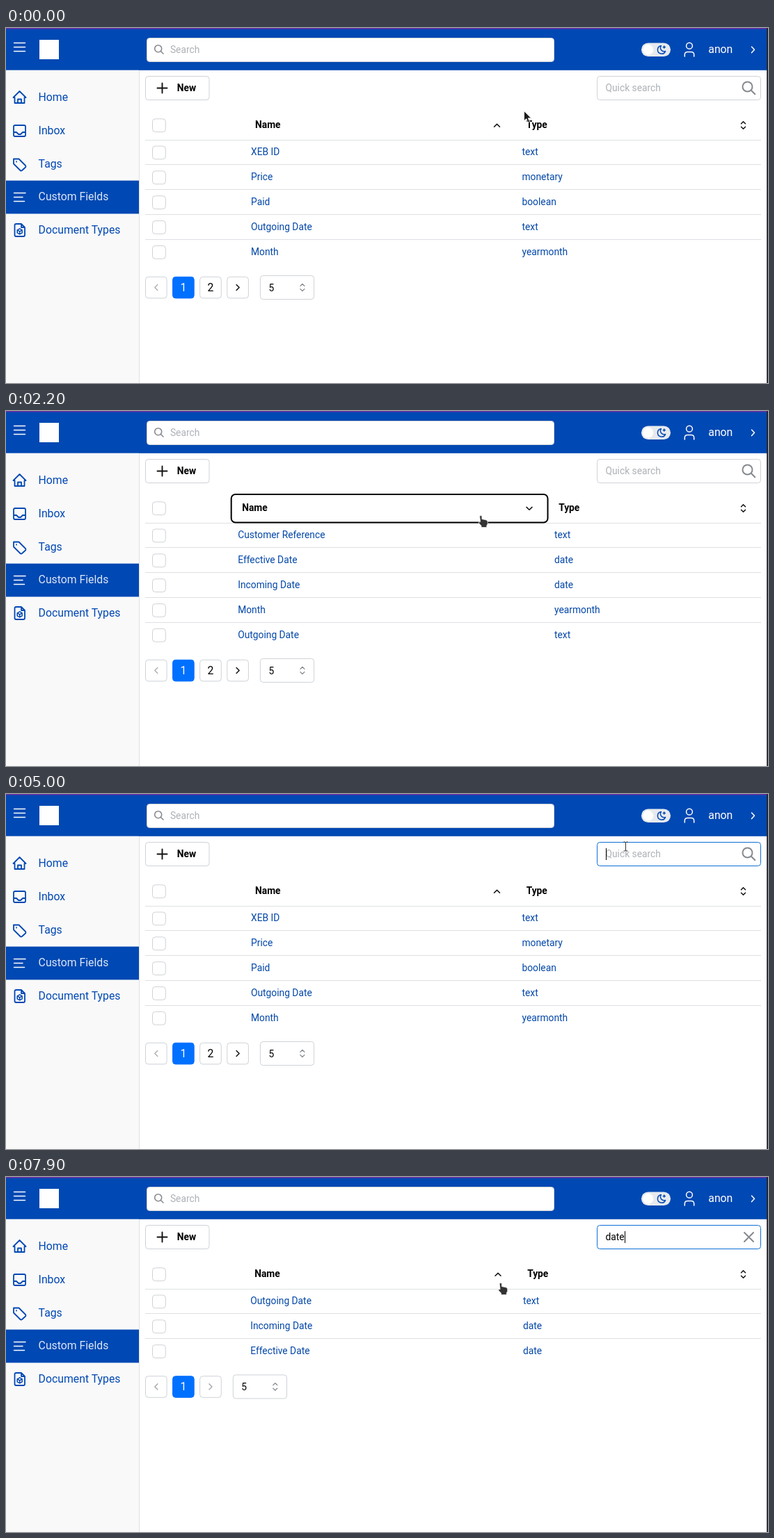
Animation, 1095 px wide and 511 px high, one loop 8 s. Source, as an HTML page:

```html
<!DOCTYPE html>
<html lang="en">
<head>
<meta charset="utf-8">
<title>Custom fields</title>
<style>
  html, body { margin: 0; width: 100%; height: 100%; overflow: hidden; background: #fff; }
  svg { display: block; font: 13.8px Roboto, sans-serif; --blue: #0048b3; --grey: #ced2d7; }
  .nav { font-size: 15.8px; fill: var(--blue); }
  .icon { fill: none; stroke: var(--blue); stroke-width: 1.8; stroke-linecap: round; stroke-linejoin: round; }
  .icon.white, .white { stroke: #fff; }
  .icon.thin, .thin { stroke-width: 1.5; }
  .box { fill: #fff; stroke: var(--grey); }
  .rule { stroke: #dee0e3; }
  .link { fill: #0347a8; }
  .bold { font-weight: 700; fill: #000; }
  .hint { fill: #adb1b6; }
  .page { font-size: 15.8px; text-anchor: middle; }
  .chev { fill: none; stroke: #111; stroke-width: 1.5; stroke-linecap: round; stroke-linejoin: round; }
  .chev.wide { stroke-width: 1.9; }
  .mute { stroke: #adb1b6; }
  .mid { stroke: #777c82; stroke-width: 1.2; }
  .find { fill: none; stroke: #868a8f; stroke-width: 2; stroke-linecap: round; }
  .find.thin { stroke-width: 1.6; }
</style>
</head>
<body>
<svg width="1095" height="511" viewBox="0 0 1095 511">
  <rect width="1095" height="511" fill="#fff"/>

  <!-- top bar -->
  <rect y="1" width="1094" height="59.8" fill="var(--blue)"/>
  <rect width="1095" height="1.5" fill="#6b2fa0"/>
  <path class="icon white thin" d="M11.5 21.5H27.5M11.5 27.5H27.5M11.5 33.5H27.5"/>
  <rect x="48" y="17" width="28" height="28" fill="#fff"/>
  <rect class="box" x="202.5" y="14.5" width="585" height="34" rx="4"/>
  <g class="find thin"><circle cx="218.7" cy="29.7" r="5"/><path d="M222.5 33.5L226 37"/></g>
  <text class="hint" x="235.9" y="36">Search</text>
  <rect x="913" y="21.5" width="42" height="19.5" rx="9.7" fill="#e7eaee"/>
  <circle cx="922.8" cy="31.2" r="7.5" fill="#fff"/>
  <path class="icon thin" d="M941.5 25.5A5.8 5.8 0 1 0 947.6 33.4A5.2 5.2 0 0 1 941.5 25.5ZM945.8 26v3M944.3 27.5h3"/>
  <g class="icon white thin"><circle cx="982" cy="25.7" r="4.4"/><path d="M975.3 41V38.5Q975.3 34.5 979.3 34.5H984.7Q988.7 34.5 988.7 38.5V41"/></g>
  <text x="1009.3" y="36.3" font-size="15.8" fill="#fff">anon</text>
  <path class="icon white thin" d="M1071.5 27l4 4.3-4 4.3"/>

  <!-- side bar -->
  <rect y="60.8" width="191" height="450.2" fill="#f9f9f9"/>
  <path class="rule" d="M191.5 61V511"/>
  <rect y="219.6" width="191" height="47.8" fill="var(--blue)"/>
  <g class="nav">
    <text x="46.6" y="105">Home</text>
    <text x="46.6" y="153">Inbox</text>
    <text x="46.6" y="201">Tags</text>
    <text x="46.6" y="248.3" fill="#dbe6f6">Custom Fields</text>
    <text x="46.6" y="296.3">Document Types</text>
  </g>
  <g class="icon">
    <path d="M12.5 100H10.5L19.5 91L28.5 100H26.5V108H12.5ZM17 108V102.5H22V108"/>
    <path d="M13 140H26Q28 140 28 142V154Q28 156 26 156H13Q11 156 11 154V142Q11 140 13 140ZM11 150H15L18 153H21L24 150H28"/>
    <path d="M11 188.5H18.5L28 198Q29 199.5 28 200.5L23 205Q21.5 206 20.5 205L11 195.5ZM15 192.2v.3"/>
    <path class="white thin" d="M11.5 237.5H28M11.5 243.5H24M11.5 249.5H26.5"/>
    <path d="M22 282H14.5Q12.5 282 12.5 284V298Q12.5 300 14.5 300H25Q27 300 27 298V287ZM22 282V287H27"/>
    <path class="thin" d="M19.7 288.8L23.2 290.8V294.8L19.7 296.8L16.2 294.8V290.8ZM16.2 290.8L19.7 292.8L23.2 290.8M19.7 292.8V296.8"/>
  </g>

  <!-- tool row -->
  <rect class="box" x="200.5" y="69.5" width="91.5" height="34" rx="4"/>
  <path class="chev wide" d="M217.5 86.5H231.5M224.5 79.5V93.5"/>
  <text class="bold" x="245.7" y="91">New</text>
  <rect id="field" class="box" x="849.5" y="69.5" width="235" height="34" rx="4"/>
  <text id="hint" class="hint" x="861.5" y="91">Quick search</text>
  <text id="query" x="861.5" y="91" fill="#000"></text>
  <rect id="caret" y="78" width="1" height="17" fill="#000"/>
  <g id="lens" class="find"><circle cx="1065.5" cy="84.5" r="7"/><path d="M1070.8 89.8L1076.3 95.3"/></g>
  <path id="clear" class="find" d="M1061 80l13 13m0-13l-13 13"/>

  <g id="table"></g>
  <rect x="1093.2" width="1.8" height="511" fill="#24232b"/>

  <!-- pointers, each with its hot spot at 0,0 -->
  <g id="pointer">
    <path id="arrow" d="M.5 .5V14.5L3.8 11.6L6 17L8.6 16L6.3 10.8H10.6Z" fill="#1b1b1b" stroke="#fff" stroke-width=".8"/>
    <path id="hand" d="M-3.4 .4Q-1.8 -1.4 -.1 .3V4.6L5.8 5.8Q8.2 6.4 8.2 8.6V11.6L6.8 14V16.5H-1V14.2L-4.8 10.2Q-5 8 -2.4 8.6Z" fill="#333" stroke="#fff" stroke-width=".7"/>
    <path id="beam" d="M-3 -6.5H-1L0 -5.5L1 -6.5H3M0 -5.5V5.5M-3 6.5H-1L0 5.5L1 6.5H3" fill="none" stroke="#333"/>
  </g>
</svg>
<script>
const $ = id => document.getElementById(id);
const LOOP = 8000, STEP = 100, PER_PAGE = 5;

const fields = [
  ['Customer Reference', 'text'], ['Effective Date', 'date'], ['Incoming Date', 'date'],
  ['Month', 'yearmonth'], ['Outgoing Date', 'text'], ['Paid', 'boolean'],
  ['Price', 'monetary'], ['XEB ID', 'text']
];

// time, x, y; straight runs between the points
const path = [
  [0, 744, 119], [200, 744, 119], [400, 800, 145], [600, 770, 163], [900, 567, 150],
  [1100, 640, 146], [1500, 674, 142], [2100, 679, 148], [2200, 684, 151], [2300, 681, 200],
  [2400, 686, 170], [2500, 688, 141], [3000, 689, 141], [3600, 689, 141], [3700, 693.3, 142],
  [3900, 693.3, 142], [4500, 883, 95], [4600, 883, 95], [5000, 890.5, 75.5], [5100, 890.5, 75.5],
  [5400, 906, 77], [5600, 903.5, 80.5], [7400, 903.5, 80.5], [7900, 712.5, 153], [8000, 712.5, 153]
];

const text = (x, y, cls, s) => `<text class="${cls}" x="${x}" y="${y}">${s}</text>`;
const box = (x, y, w, h, extra = '') => `<rect class="box" x="${x}" y="${y}" width="${w}" height="${h}" rx="4" ${extra}/>`;
const line = (d, cls) => `<path class="${cls}" d="${d}"/>`;
const check = y => box(210.5, y, 18.8, 18.8);
const sorter = (x, y, cls = '') =>
  line(`M${x - 3} ${y - 2.2}l3-3 3 3M${x - 3} ${y + 2.2}l3 3 3-3`, 'chev ' + cls);

function columns(query, rising) {
  if (query) return [351.2, 743];
  return rising ? [333.2, 788] : [352, 741.5];
}

function drawPager(y, pages) {
  const slot = i => 200.5 + 39.1 * i;
  const cell = (i, extra) => box(slot(i), y - 15.2, 30.6, 30.6, extra);
  const step = (i, dir, off) => cell(i) +
    line(`M${slot(i) + 15.3 - 2 * dir} ${y - 4}l${4 * dir} 4l${-4 * dir} 4`, off ? 'chev mute' : 'chev');
  let out = step(0, -1, true);
  for (let i = 1; i <= pages; i++) {
    const on = i === 1;
    out += cell(i, on ? 'style="fill:#0070ff;stroke:#0070ff"' : '') +
      `<text class="page" x="${slot(i) + 15.3}" y="${y + 5.5}" fill="${on ? '#fff' : '#000'}">${i}</text>`;
  }
  const x = slot(pages + 2) + 8.5;
  return out + step(pages + 1, 1, pages === 1) + box(x, y - 17, 77.2, 34) +
    text(x + 12, y + 5, '', PER_PAGE) + sorter(x + 60.5, y, 'mid');
}

function drawTable(query, rising, focus) {
  const hits = fields.filter(f => f[0].toLowerCase().includes(query));
  if (!rising) hits.reverse();
  const rows = hits.slice(0, PER_PAGE);
  const [nameX, typeX] = columns(query, rising);
  const tip = rising ? 3.8 : -3.8;
  let out = check(130.8) + line('M200 161.5H1085', 'rule');
  if (focus) out += `<rect x="${nameX - 9.5}" y="120" width="${typeX - nameX}" height="40.5" rx="6" fill="#fff" stroke="#000" stroke-width="2"/>`;
  out += text(nameX + 6, 144.3, 'bold', 'Name') + text(typeX + 6.2, 144.3, 'bold', 'Type') +
    line(`M${typeX - 40} ${140.3 - tip / 2}l4 ${tip}l4 ${-tip}`, 'chev') + sorter(1059.5, 140);
  rows.forEach(([name, type], i) => {
    const y = 35.85 * i;
    out += check(170 + y) + text(nameX, 183.3 + y, 'link', name) + text(typeX, 183.3 + y, 'link', type);
    if (i < rows.length - 1) out += line(`M200 ${196.5 + 36 * i}H1085`, 'rule');
  });
  return out + drawPager(194.5 + 35.8 * rows.length, Math.ceil(hits.length / PER_PAGE));
}

function pointerAt(t) {
  const i = path.findIndex(p => p[0] > t);
  const [a, b] = [path[i - 1], path[i]];
  const k = (t - a[0]) / (b[0] - a[0]);
  return [a[1] + (b[1] - a[1]) * k, a[2] + (b[2] - a[2]) * k];
}

const within = (t, from, to) => t >= from && t < to;
const show = (id, on) => $(id).style.display = on ? '' : 'none';
let shown = -1, tableKey = '';

function draw(t) {
  const typed = 'date'.slice(0, [5900, 6100, 6300, 6400].filter(at => t >= at).length);
  const filter = t < 6000 ? '' : t < 7600 ? 'd' : 'date';
  const rising = within(t, 1600, 2800);
  const focus = within(t, 1400, 4900);
  const key = [filter, rising, focus].join();
  if (key !== tableKey) {
    $('table').innerHTML = drawTable(filter, rising, focus);
    tableKey = key;
  }

  $('field').style.stroke = t >= 4900 ? '#0b6fd6' : '';
  $('query').textContent = typed;
  $('caret').setAttribute('x', Math.round(861.5 + (typed ? $('query').getComputedTextLength() : 0)));
  show('caret', within(t, 4900, 5400) || within(t, 5900, 7000) || t >= 7500);
  show('hint', !typed);
  show('lens', !typed);
  show('clear', typed);

  const [x, y] = pointerAt(t);
  const inField = within(x, 849, 1085) && within(y, 69, 104);
  const inHead = within(x, columns(filter, rising)[0] - 10, 1085) && within(y, 121, 161);
  $('pointer').setAttribute('transform', `translate(${x} ${y})`);
  show('beam', inField);
  show('hand', inHead);
  show('arrow', !inField && !inHead);
}

const start = performance.now();
function tick() {
  const t = Math.floor((performance.now() - start) % LOOP / STEP) * STEP;
  if (t !== shown) draw(shown = t);
  requestAnimationFrame(tick);
}
tick();
</script>
</body>
</html>
```
